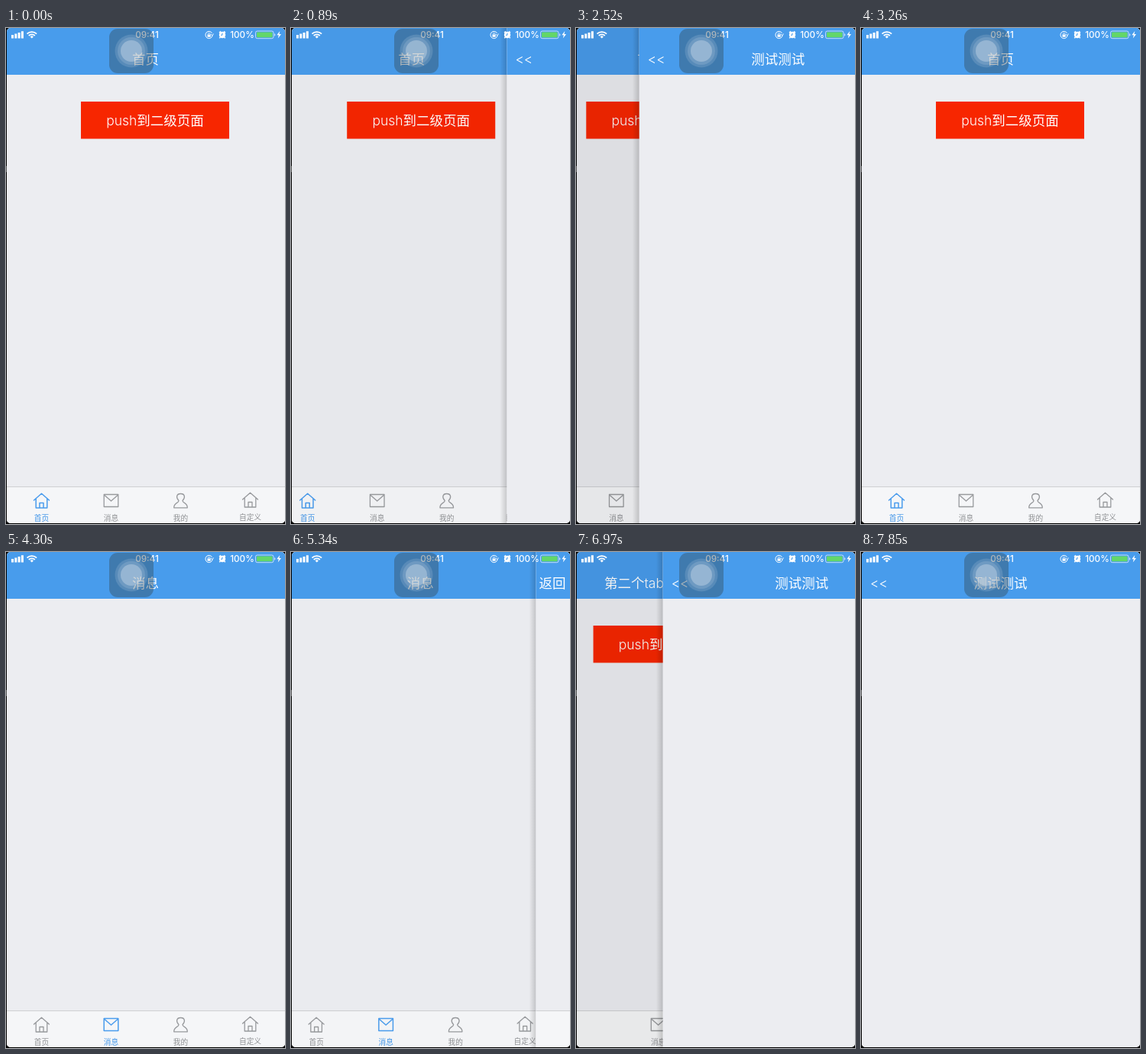
Recreate the animation shown at these times as an HTML page. Size 365x647 px, loop 8 s.

```html
<!DOCTYPE html>
<html lang="zh-CN">
<head>
<meta charset="utf-8">
<style>
html, body { margin: 0; height: 100%; overflow: hidden; background: #000; }
svg { display: block; }
text { font: 350 17.5px Inter, "Noto Sans CJK SC", "Noto Sans CJK", sans-serif; fill: #fff; text-anchor: middle; }
.status { font-size: 11.7px; font-weight: 500; }
.left { text-anchor: start; }
.tab { fill: none; stroke: #989a9d; stroke-width: 1.3; stroke-linejoin: round; stroke-linecap: round; }
.tab text { font-size: 9.7px; font-weight: 400; fill: #8e9093; stroke: none; }
.tab.on { stroke: #4a9ced; stroke-width: 1.5; }
.tab.on text { fill: #3f94e8; font-weight: 500; }
</style>
</head>
<body>
<svg width="365" height="647" viewBox="0 0 365 647">
  <defs>
    <clipPath id="screen"><rect x="1" width="364" height="646" rx="5"/></clipPath>
    <linearGradient id="shadow">
      <stop offset="0" stop-color="#000" stop-opacity="0"/>
      <stop offset="1" stop-color="#000" stop-opacity=".17"/>
    </linearGradient>
  </defs>
  <rect y="180" width="1" height="8" fill="#555"/>
  <g clip-path="url(#screen)">
    <rect width="365" height="647" fill="#ecedf1"/>
    <g id="pages"></g>

    <g id="status" fill="#fff">
      <path d="M7 9h3v4.500h-3zM11.300 7.500h3v6h-3zM15.600 6h3v7.500h-3zM19.900 4.300h3v9.200h-3z"/>
      <g fill="none" stroke="#fff" stroke-width="1.800">
        <path d="M27.500 7.600a9 9 0 0 1 12.600 0M29.800 10a5.700 5.700 0 0 1 8 0"/>
      </g>
      <path d="M33.800 13.600l-2.100-2.200a3 3 0 0 1 4.200 0z"/>
      <text class="status" x="184.500" y="13">09:41</text>
      <path d="M269.600 6.800a4.600 4.600 0 1 0 .5 3M271.500 7.500l-1.600 2.300-1.800-1.900" fill="none" stroke="#fff"/>
      <path d="M263.500 8.500h4.200v3.200h-4.200z"/>
      <path d="M264.400 8.500v-.8a1.200 1.200 0 0 1 2.400 0v.8" fill="none" stroke="#fff" stroke-width=".8"/>
      <circle cx="283" cy="9" r="4.200"/>
      <path d="M279 6.200l2-1.800M287 6.200l-2-1.800M280.300 12l-1 1.300M285.700 12l1 1.300" stroke="#fff" stroke-width="1.500"/>
      <path d="M283 6.600v2.600h-2" fill="none" stroke="#489cec"/>
      <text class="status" x="309" y="13">100%</text>
      <rect x="326.500" y="4" width="23.500" height="9.700" rx="2.300" fill="none" stroke="#fff" stroke-opacity=".65"/>
      <rect x="328" y="5.500" width="20.500" height="6.700" rx="1" fill="#63d769"/>
      <path d="M351 7.300q1.500.4 1.500 1.600t-1.500 1.600z" fill-opacity=".65"/>
      <path d="M358.300 4l-4 5.300h2.500l-1 4.300 4.200-5.500h-2.600z"/>
    </g>

    <g id="touch">
      <rect x="135" y="1" width="58" height="58" rx="11" fill="#324650" fill-opacity=".4"/>
      <g fill="#fff" fill-opacity=".13">
        <circle cx="164" cy="30" r="21.500"/>
        <circle cx="164" cy="30" r="18"/>
        <circle cx="164" cy="30" r="14" fill-opacity=".27"/>
      </g>
    </g>
  </g>
</svg>
<script>
const WIDTH = 364, LOOP = 8000, TICK = 148.15;

// Tab icons, centred on x = 0
const HOME = '<path d="M-10 616L0 607.300 10 616M-7.300 614v12h14.600v-12M-2.500 626v-6.500h5v6.500"/>';
const MAIL = '<path d="M-9.300 608.500h18.600v16h-18.600zM-8 610L0 617 8 610"/>';
const USER = '<path d="M-2.500 616.500c-4-4-3-9 2.500-9s6.500 5 2.500 9c0 3.500 6.300 2.500 6.300 9.300h-17.600c0-6.800 6.300-5.800 6.300-9.300z"/>';
const TABS = [[HOME, '首页'], [MAIL, '消息'], [USER, '我的'], [HOME, '自定义']];

function tabBar(count, active) {
  const items = TABS.slice(0, count).map(([icon, label], i) => {
    const x = WIDTH * (i + .5) / count, y = i === 3 ? -1 : 0;
    return `<g class="tab ${i === active ? 'on' : ''}" transform="translate(${x} ${y})">
      ${icon}<text y="642.500">${label}</text></g>`;
  });
  return `<rect y="598" width="${WIDTH}" height="49" fill="#f5f6f8"/>
    <rect y="598" width="${WIDTH}" height="1" fill="#cfd0d3"/>${items.join('')}`;
}

const button = label => `<rect x="97" y="96" width="194" height="48.500" fill="#f72600"/>
  <text x="194" y="126.500">${label}</text>`;
const back = (x, label) => `<text class="left" x="${x}" y="46.500">${label}</text>`;

// Listed from back to front
const pages = {
  home: ['首页', button('push到二级页面') + tabBar(4, 0)],
  message: ['消息', tabBar(4, 1)],
  second: ['第二个tabBar首页', back(4, '返回') + button('push到三级页面') + tabBar(3, 0)],
  test: ['测试测试', back(11, '&lt;&lt;')]
};

document.getElementById('pages').innerHTML = Object.entries(pages).map(([id, [title, content]]) =>
  `<g id="${id}">
    <rect x="-9" width="9" height="647" fill="url(#shadow)"/>
    <rect width="${WIDTH}" height="647" fill="#ecedf1"/>
    <rect width="${WIDTH}" height="61" fill="#489cec"/>
    <text x="181.500" y="46.500">${title}</text>
    ${content}
    <rect class="dim" width="${WIDTH}" height="647"/>
  </g>`).join('');

// Start time, lower page, upper page, coverage before and after
const timeline = [
  [0, 'home', 'test', 0, 0],
  [840, 'home', 'test', 0, 1],
  [2470, 'home', 'test', 1, 0],
  [3850, 'message', 'second', 0, 0],
  [5301, 'message', 'second', 0, 1],
  [6831, 'second', 'test', 0, 1]
];

// Critically damped spring
const spring = ms => 1 - Math.exp(-.018 * ms) * (1 + .018 * ms);

function place(id, x, dim, visible) {
  const page = document.getElementById(id);
  page.setAttribute('transform', `translate(${1 + x} 0)`);
  page.setAttribute('visibility', visible ? 'visible' : 'hidden');
  page.querySelector('.dim').setAttribute('opacity', dim);
}

function render(now) {
  const time = Math.floor((now % LOOP + 10) / TICK) * TICK + 1;
  const [start, lower, upper, from, to] = timeline.findLast(step => step[0] <= time);
  const cover = from + (to - from) * spring(time - start);
  for (const id in pages) place(id, 0, 0, false);
  place(lower, -.3 * WIDTH * cover, .08 * cover, true);
  place(upper, WIDTH * (1 - cover), 0, cover > .003);
  requestAnimationFrame(() => render(performance.now()));
}
render(performance.now());
</script>
</body>
</html>
```
